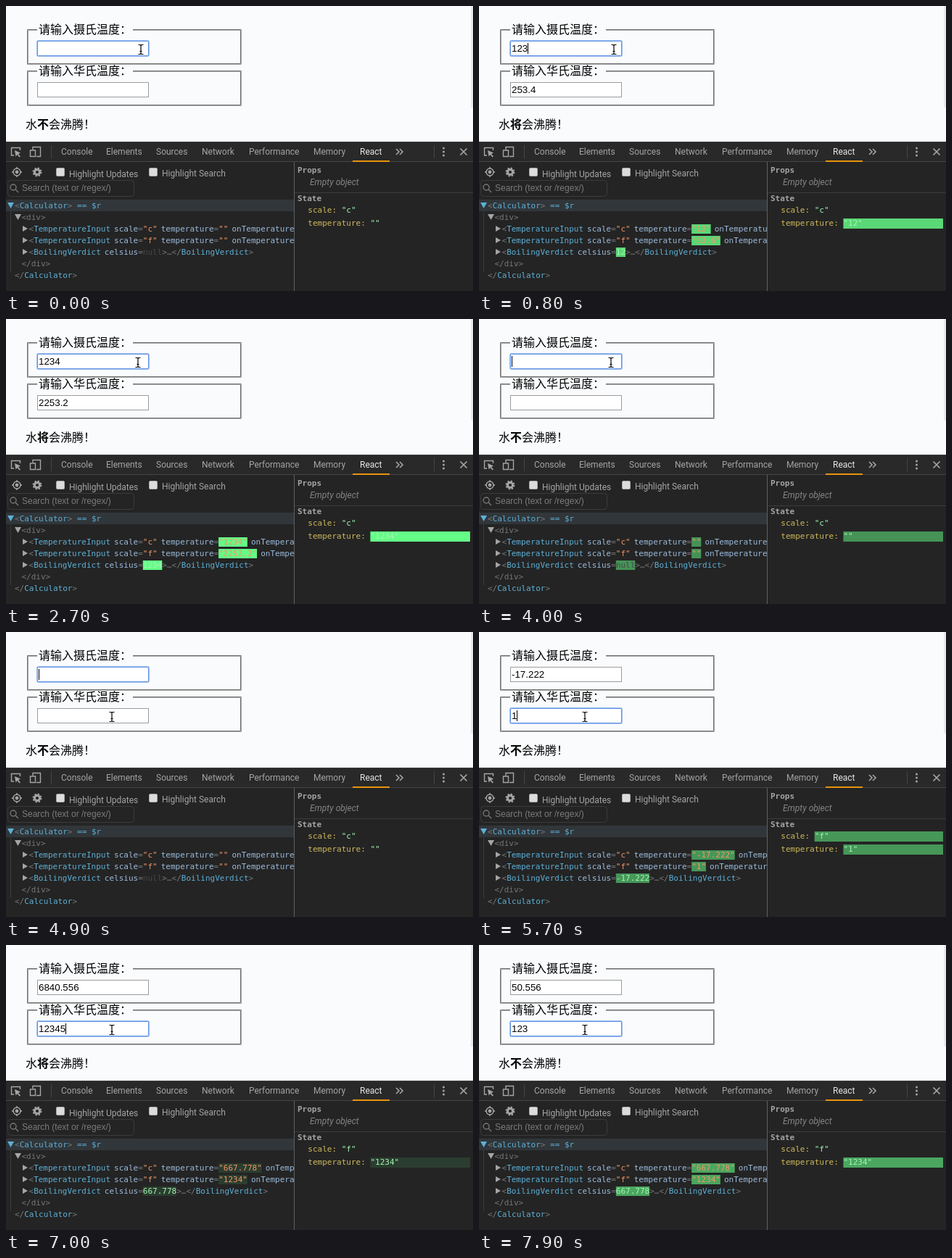
An HTML page for the animation above (8000 ms loop, 644 px wide and 393 px high).

```html
<!DOCTYPE html>
<html lang="zh-CN">
<head>
<meta charset="utf-8">
<title>温度计算器</title>
<style>
html, body { margin: 0; width: 100%; height: 100%; overflow: hidden; background: #f9fbfd; }
svg { display: block; }
text { white-space: pre; }
.page { font: 16px "Noto Sans CJK SC", "Noto Sans CJK", sans-serif; fill: #000; }
.value { font: 13.333px "Liberation Sans", Arial, sans-serif; fill: #000; }
.ui { font: 12px Roboto, sans-serif; fill: #a5a5a5; }
.search { font: 12px "Liberation Sans", Arial, sans-serif; fill: #7b7b7b; }
.mono { font: 11px "DejaVu Sans Mono", monospace; fill: #777; }
.tag { fill: #5db0d7; }
.attr { fill: #9bbbdc; }
.str { fill: #f29766; }
.pale { fill: #a1f7b5; }
.key { fill: #d0b95a; }
.head { font-weight: bold; fill: #a5a5a5; }
.icon { fill: none; stroke: #a5a5a5; stroke-width: 1.4; }
</style>
</head>
<body>
<svg id="stage" width="644" height="393" viewBox="0 0 644 393" xmlns="http://www.w3.org/2000/svg"></svg>
<script>
const LOOP = 8000, STEP = 100, CHAR = 6.622;
const FLASH = '#66ff88';

// [time, scale, typed text]: what the focused input holds
const keys = [
  [0, 'c', ''], [300, 'c', '1'], [500, 'c', '12'], [800, 'c', '123'], [1200, 'c', '1234'],
  [1700, 'c', '12345'], [2120, 'c', '1234'], [2900, 'c', '123'], [3150, 'c', '12'],
  [3450, 'c', '1'], [3720, 'c', ''], [5100, 'f', ''], [5300, 'f', '1'], [5800, 'f', '12'],
  [6000, 'f', '123'], [6300, 'f', '1234'], [6900, 'f', '12345'], [7150, 'f', '1234'], [7350, 'f', '123']
];
// what the inspector shows, lagging behind the inputs
const updates = [
  [0, 'c', ''], [350, 'c', '1'], [650, 'c', '12'], [900, 'c', '123'], [1200, 'c', '1234'],
  [1800, 'c', '12345'], [2680, 'c', '1234'], [3050, 'c', '123'], [3400, 'c', '12'],
  [3710, 'c', ''], [5420, 'f', '1'], [5900, 'f', '12'], [6150, 'f', '123'],
  [6400, 'f', '1234'], [7120, 'f', '12345'], [7650, 'f', '1234']
];
const pointer = [[0, 186, 60], [2200, 186, 60], [2500, 182, 60], [4300, 182, 60], [4850, 146, 117], [LOOP, 146, 117]];

const rect = (x, y, w, h, fill, extra = '') =>
  `<rect x="${x}" y="${y}" width="${w}" height="${h}" fill="${fill}" ${extra}/>`;
const text = (x, y, cls, body, extra = '') => `<text x="${x}" y="${y}" class="${cls}" ${extra}>${body}</text>`;
const path = (d, extra = '') => `<path d="${d}" class="icon" ${extra}/>`;
const span = (cls, body, id = '') => `<tspan class="${cls}"${id && ` id="${id}"`}>${body}</tspan>`;
const attr = (name, value) => `<tspan dx="5" class="attr">${name}</tspan>=${value}`;

function fieldset(y, label, name) {
  const groove = (dark, light, d) =>
    path(d[0], `style="stroke:${dark};stroke-width:1"`) + path(d[1], `style="stroke:${light};stroke-width:1"`);
  return groove('#707070', '#a6a6a6', [
      `M43 ${y + .5}H29.5V${y + 49}M175 ${y + .5}H325M31 ${y + 47.5}H323.5V${y + 1}`,
      `M43 ${y + 1.5}H30.5V${y + 48}M175 ${y + 1.5}H324M29 ${y + 48.5}H324.5V${y}`]) +
    text(45, y + 6, 'page', label) +
    rect(43.5, y + 16.5, 153, 20, '#fff', 'stroke="#9c9c9c"') +
    `<g id="ring-${name}">` +
    rect(42.5, y + 15.5, 155, 22, 'none', 'stroke="#9dbcf0" rx="2"') +
    rect(43.5, y + 16.5, 153, 20, 'none', 'stroke="#5f93e4" rx="1"') + '</g>' +
    text(45, y + 31, 'value', '', `id="in-${name}"`) +
    rect(45, y + 19, 1, 15, '#000', `id="caret-${name}"`);
}

function toolbar() {
  const tabs = [[76, 'Console'], [138, 'Elements'], [207, 'Sources'], [270, 'Network'],
    [335, 'Performance'], [424, 'Memory'], [488, 'React']];
  return rect(0, 187, 644, 206, '#242424') + rect(0, 187, 644, 28, '#292929') +
    rect(0, 187, 644, 1, '#404040') + rect(0, 214, 644, 1, '#454545') +
    tabs.map(([x, name]) => text(x, 205, 'ui', name, name === 'React' ? 'style="fill:#e8e8e8"' : '')).join('') +
    rect(478, 213, 51, 2, '#e8930c') +
    rect(62, 192, 1, 18, '#454545') + rect(590, 192, 1, 18, '#454545') +
    path('M11 206H7.5V195.500H19.500V199') + path('M12 199L20 202.500L17 204L20 207.500L18.500 208.500L15.500 205L13.500 207.500Z', 'style="fill:#a5a5a5;stroke:none"') +
    path('M37 198V194.500H47.500V207.500H42M33.500 199H40.500V207.500H33.500Z') +
    path('M538 197L542 201L538 205M543 197L547 201L543 205', 'style="stroke-width:1.6"') +
    [196, 201, 206].map(y => `<circle cx="603.5" cy="${y}" r="1.5" fill="#a5a5a5"/>`).join('') +
    path('M626.500 196.500L635.500 205.500M635.500 196.500L626.500 205.500', 'style="stroke-width:1.7"');
}

function options() {
  const box = x => rect(x + .5, 223.5, 11, 11, '#dcdcdc', 'rx="1.5" stroke="#a9a9a9"');
  return '<circle cx="15" cy="229" r="5" class="icon"/><circle cx="15" cy="229" r="2.4" fill="#a5a5a5"/>' +
    path('M15 222V225M15 233V236M8 229H11M19 229H22') +
    '<circle cx="43" cy="229" r="3.600" class="icon" style="stroke-width:3"/>' +
    '<circle cx="43" cy="229" r="5.500" class="icon" style="stroke-width:2" stroke-dasharray="2.3 2.020"/>' +
    box(69) + text(87, 236, 'ui', 'Highlight Updates') +
    box(197) + text(215, 235, 'ui', 'Highlight Search') +
    rect(2.5, 240.5, 174, 22, '#242424', 'rx="4" stroke="#3c3c3c"') +
    '<circle cx="10" cy="250" r="4" class="icon" style="stroke:#777"/>' +
    path('M13 253L17 257', 'style="stroke:#777"') +
    text(22, 255, 'search', 'Search (text or /regex/)');
}

function tree() {
  const arrow = (x, y, open, fill) =>
    `<path d="${open ? `M${x} ${y - 4}h9l-4.500 8z` : `M${x} ${y - 4}v8l7 -4z`}" fill="${fill}"/>`;
  const flash = (id, x, y) => rect(x, y - 10, 0, 13, FLASH, `id="${id}"`);
  const input = (y, scale) => arrow(23, y - 4, false, '#a5a5a5') + flash('hot-' + scale, 293.1, y) +
    text(31.5, y, 'mono', '&lt;' + span('tag', 'TemperatureInput') +
      attr('scale', span('str', `"${scale}"`)) + attr('temperature', span('str', '', 'dev-' + scale)) +
      attr('onTemperatureChange', 'onTemperatureChange()'));
  return '<g clip-path="url(#left)">' + rect(0, 267, 397, 16, '#31363a') + rect(6, 283, 1, 84, '#383d40') +
    arrow(2, 275, true, '#5db0d7') +
    text(12, 279, 'mono', '&lt;' + span('tag', 'Calculator') + '&gt;' + span('tag', ' == $r')) +
    arrow(12, 291, true, '#a5a5a5') + text(21.5, 295, 'mono', '&lt;div&gt;') +
    input(311, 'c') + input(327, 'f') +
    arrow(23, 339, false, '#a5a5a5') + flash('hot-verdict', 188.8, 343) +
    text(31.5, 343, 'mono', '&lt;' + span('tag', 'BoilingVerdict') + attr('celsius', span('pale', '', 'dev-verdict')) +
      '&gt;…&lt;/' + span('tag', 'BoilingVerdict') + '&gt;') +
    text(21.5, 359, 'mono', '&lt;/div&gt;') +
    text(12, 375, 'mono', '&lt;/' + span('tag', 'Calculator') + '&gt;') + '</g>';
}

function statePane() {
  const row = (y, name, id) => {
    const x = 416.3 + (name.length + 2) * CHAR;
    return rect(x, y - 10, 640 - x, 14, FLASH, `id="hot-${id}"`) +
      text(416.3, y, 'mono', span('key', name + ':') + ' ' + span('pale', '', 'dev-' + id));
  };
  return rect(397, 215, 1, 178, '#606060') + rect(398, 257, 246, 1, '#3c3c3c') +
    text(402, 230, 'mono head', 'Props') +
    text(419, 247, 'ui', 'Empty object', 'style="font-style:italic;fill:#858585"') +
    text(402, 269, 'mono head', 'State') +
    row(285, 'scale', 'scale') + row(303, 'temperature', 'temp');
}

const ibeam = 'M-3.500 -6.500H-1L0 -5.500L1 -6.500H3.500M0 -5.500V5.500M-3.500 6.500H-1L0 5.500L1 6.500H3.500M-1.500 2.500H1.500';
document.getElementById('stage').innerHTML =
  '<clipPath id="left"><rect x="0" y="264" width="397" height="129"/></clipPath>' +
  rect(0, 0, 644, 187, '#f9fbfd') + rect(641, 0, 3, 140, '#e6e9f0') +
  fieldset(32, '请输入摄氏温度：', 'c') + fieldset(89, '请输入华氏温度：', 'f') +
  text(27, 169, 'page', '水<tspan id="verdict" font-weight="bold"></tspan>会沸腾！') +
  toolbar() + options() + tree() + statePane() +
  `<g id="pointer"><path d="${ibeam}" fill="none" stroke="#fff" stroke-width="2.600"/>` +
  `<path d="${ibeam}" fill="none" stroke="#000" stroke-width="1.200"/></g>`;

const el = {};
document.querySelectorAll('[id]').forEach(node => { el[node.id] = node; });

const latest = (list, t) => list.filter(item => item[0] <= t).pop();
const show = (id, on) => el[id].setAttribute('visibility', on ? 'visible' : 'hidden');

function temperatures(scale, typed) {
  if (!typed) return { c: '', f: '' };
  const n = +typed, round = v => String(Math.round(v * 1000) / 1000);
  return scale === 'c' ? { c: typed, f: round(n * 1.8 + 32) } : { c: round((n - 32) / 1.8), f: typed };
}

// CSS "ease", cubic-bezier(.25, .1, .25, 1)
function ease(x) {
  if (x >= 1) return 1;
  const bezier = (u, a, b) => 3 * u * (1 - u) ** 2 * a + 3 * u * u * (1 - u) * b + u ** 3;
  let lo = 0, hi = 1;
  for (let i = 0; i < 20; i++) {
    const mid = (lo + hi) / 2;
    if (bezier(mid, .25, .25) < x) lo = mid; else hi = mid;
  }
  return bezier(lo, .1, 1);
}

function drawPage(t) {
  const [since, focus, typed] = latest(keys, t);
  const temps = temperatures(focus, typed);
  const blinkOn = since > 0 && Math.floor((t - since) / 500) % 2 === 0;
  for (const name of ['c', 'f']) {
    el['in-' + name].textContent = temps[name];
    show('ring-' + name, name === focus);
    show('caret-' + name, name === focus && blinkOn);
  }
  el['caret-' + focus].setAttribute('x', 45 + Math.round(typed.length * 7.415));
  el.verdict.textContent = temps.c && +temps.c >= 100 ? '将' : '不';

  const next = pointer.findIndex(p => p[0] > t);
  const [a, b] = [pointer[next - 1], pointer[next]];
  const u = (t - a[0]) / (b[0] - a[0]), s = u * u * (3 - 2 * u);
  const at = i => Math.round(a[i] + (b[i] - a[i]) * s);
  el.pointer.setAttribute('transform', `translate(${at(1)} ${at(2)})`);
}

function drawInspector(t) {
  const [since, scale, typed] = latest(updates, t);
  const temps = temperatures(scale, typed);
  const glow = start => start ? 1 - ease((t - start) / 1000) : 0;
  const put = (id, value, start, inline) => {
    el['dev-' + id].textContent = value;
    el['hot-' + id].setAttribute('fill-opacity', glow(start));
    if (inline) el['hot-' + id].setAttribute('width', value.length * CHAR);
  };
  put('c', `"${temps.c}"`, since, true);
  put('f', `"${temps.f}"`, since, true);
  put('verdict', temps.c || 'null', since, true);
  el['dev-verdict'].style.fill = temps.c ? '' : '#484848';
  const switched = scale === 'f' ? updates.find(item => item[1] === 'f')[0] : 0;
  put('scale', `"${scale}"`, switched);
  put('temp', `"${typed}"`, since);
}

function frame(now) {
  const t = Math.floor((now % LOOP) / STEP) * STEP;
  drawPage(t);
  drawInspector(t);
}

let start;
function tick(now) {
  start ??= now;
  frame(now - start);
  requestAnimationFrame(tick);
}
frame(0);
requestAnimationFrame(tick);
</script>
</body>
</html>
```
